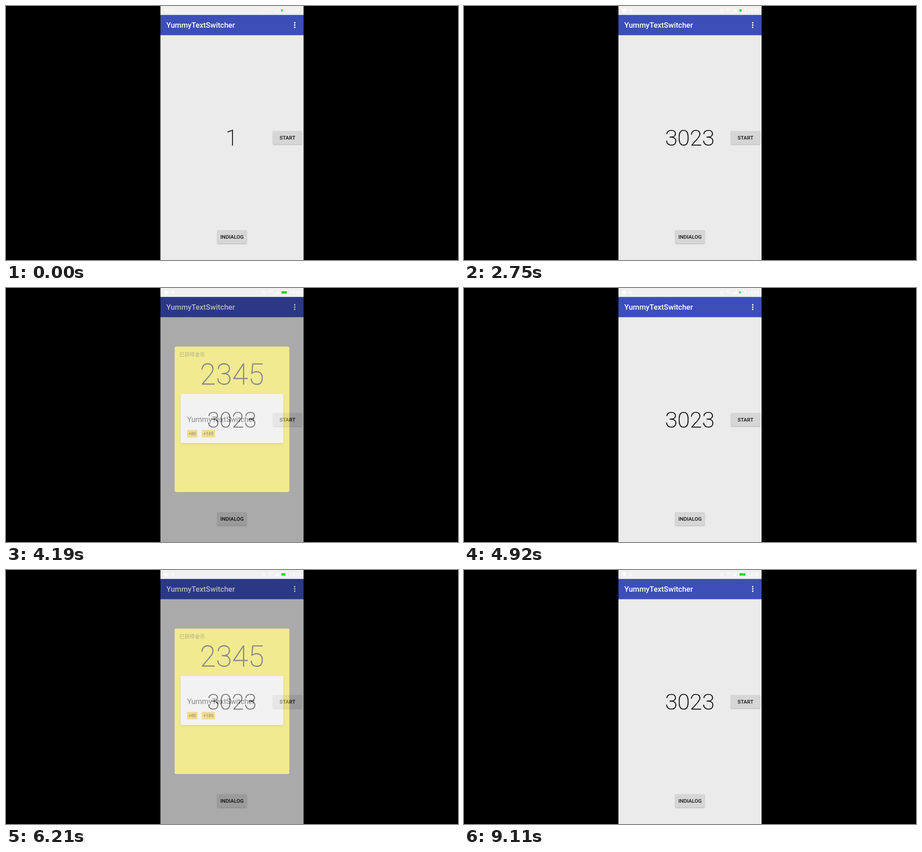
Write an HTML page with a canvas that moves like this. It is 998 by 561 pixels and loops after 9.52 s.

```html
<!DOCTYPE html>
<html lang="en">
<head>
<meta charset="utf-8">
<title>YummyTextSwitcher</title>
<style>
html, body { margin: 0; width: 100%; height: 100%; overflow: hidden; background: #000; }
canvas { display: block; width: 998px; height: 561px; }
</style>
</head>
<body>
<canvas id="stage" width="998" height="561"></canvas>
<script>
const W = 998, H = 561, LOOP = 9520;
const stage = document.getElementById('stage').getContext('2d');
const layer = Object.assign(document.createElement('canvas'), { width: W, height: H });
const dialogCtx = layer.getContext('2d');

const clamp = (v, lo = 0, hi = 1) => Math.min(hi, Math.max(lo, v));
const easeOut = u => 1 - (1 - u) ** 2;

// Main counter: press time and the text shown before it
const SPINS = [{ at: 670, from: '1' }, { at: 6970, from: '3023' }];
const SPIN_DELAY = 253, SPIN_END = 1320;
// Dialog: press time and the moment it starts to close
const DIALOGS = [{ at: 2490, close: 4070 }, { at: 4600, close: 6090 }];
const BATTERY = [2.5, 5, 7, 9, 12, 13.5];

const BIG = { x: 498.5, y: 291, em: 49, cell: 27.2, row: 62, top: 262, bottom: 319 };
const DIALOG_BIG = { x: 499, y: 191.5, em: 64, cell: 35.5, row: 81, top: 156, bottom: 224 };

function rect(c, x, y, w, h, fill, r = 0) {
  c.fillStyle = fill;
  c.beginPath();
  c.roundRect(x, y, w, h, r);
  c.fill();
}

function dot(c, x, y, r, fill) {
  c.fillStyle = fill;
  c.beginPath();
  c.arc(x, y, r, 0, 7);
  c.fill();
}

function label(c, text, x, y, font, fill = '#000', align = 'left') {
  c.font = font;
  c.fillStyle = fill;
  c.textAlign = align;
  c.fillText(text, x, y);
}

function shadowed(c, blur, dy, alpha, draw) {
  c.save();
  c.shadowColor = `rgba(0,0,0,${alpha})`;
  c.shadowBlur = blur;
  c.shadowOffsetY = dy;
  draw();
  c.restore();
}

function digits(c, box, text, cy, blur) {
  const { x, em, cell } = box;
  c.font = `100 ${em}px Roboto, sans-serif`;
  c.textAlign = 'center';
  c.lineJoin = 'round';
  c.lineWidth = em * (0.013 + 0.1 * blur);
  c.fillStyle = c.strokeStyle = '#000';
  c.globalAlpha = 1 - 0.64 * blur;
  c.filter = blur > 0 ? `blur(${em * 0.035 * blur}px)` : 'none';
  [...text].forEach((ch, i) => {
    const dx = x + (i - (text.length - 1) / 2) * cell;
    const dy = cy + em * 0.3555;
    if (blur < 0.5) c.fillText(ch, dx, dy);
    c.strokeText(ch, dx, dy);
  });
}

// A ribbon of rows scrolling upwards through the clipped window
function ribbon(c, box, from, to, rows, pos, blur) {
  c.save();
  c.beginPath();
  c.rect(box.x - box.cell * 2 - 1.5, box.top, box.cell * 4 + 3, box.bottom - box.top);
  c.clip();
  const first = Math.floor(pos);
  for (let k = first; k <= Math.min(first + 1, rows); k++) {
    const text = k === 0 ? from : k === rows ? to : String((k + 8) % 10).repeat(4);
    digits(c, box, text, box.y + (k - pos) * box.row, blur);
  }
  c.restore();
}

const spinBlur = u => clamp((1 - u) * 2.5 - 0.3);

function button(text, x, y) {
  shadowed(stage, 2, 1, 0.25, () => rect(stage, x, y, 65, 29.5, '#d6d6d6', 2));
  label(stage, text, x + 32.5, y + 19, '500 11.5px Roboto, sans-serif', '#111', 'center');
}

function statusBar(t) {
  const c = stage;
  rect(c, 341, 0, 316, 19.5, '#f0f0f0');
  c.save();
  c.globalAlpha = t < 290 ? 0.4 : 1;
  dot(c, 354, 9.5, 4.5, '#fff');
  c.strokeStyle = '#fff';
  c.lineWidth = 1;
  c.beginPath();
  c.moveTo(368, 5); c.lineTo(368, 14);
  c.moveTo(365, 8); c.lineTo(365, 10); c.lineTo(368, 12); c.lineTo(371, 10); c.lineTo(371, 8);
  c.moveTo(572.5, 10); c.arc(568.5, 10, 4, 0, 7);
  c.moveTo(568.5, 7.5); c.lineTo(568.5, 10.5); c.lineTo(570.5, 10.5);
  for (const r of [3, 6, 9]) {
    c.moveTo(583 - r * 0.7, 14 - r * 0.7);
    c.arc(583, 14, r, -Math.PI * 0.75, -Math.PI * 0.25);
  }
  c.rect(607.5, 6.5, 14, 6.5);
  c.stroke();
  for (let i = 0; i < 4; i++) rect(c, 592 + i * 3, 12 - i * 2, 2, 2 + i * 2, '#fff');
  label(c, '14:06', 626, 13.5, '10.5px Roboto, sans-serif', '#fff');
  c.restore();
  const step = Math.floor((Math.min(t, 9500) - 2290) / 401);
  rect(c, 608, 7, BATTERY[(step + 12) % 6], 5.5, '#14dc28');
}

function counter(t) {
  const run = t < 6000 ? SPINS[0] : SPINS[1];
  const u = clamp((t - run.at - SPIN_DELAY) / (SPIN_END - SPIN_DELAY));
  ribbon(stage, BIG, run.from, '3023', 16, 16 * easeOut(u), u > 0 ? spinBlur(u) : 0);
}

function screen(t) {
  rect(stage, 0, 0, W, H, '#000');
  rect(stage, 341, 0, 316, H, '#ebebeb');
  rect(stage, 341, 19.5, 316, 45, '#3c4eb8');
  label(stage, 'YummyTextSwitcher', 354, 48.3, '500 16.46px Roboto, sans-serif', '#fff');
  for (const y of [37, 42, 47]) dot(stage, 637.5, y, 1.75, '#fff');
  counter(t);
  button('START', 589, 276);
  button('INDIALOG', 466.5, 495);
}

function chip(c, text, x, w) {
  rect(c, x, 315, w, 16.3, '#fcc40c');
  label(c, text, x + w / 2, 326.8, '9.9px Roboto, sans-serif', '#000', 'center');
}

function drawDialog(t, run, scale, dy) {
  const c = dialogCtx;
  c.setTransform(1, 0, 0, 1, 0, 0);
  c.clearRect(0, 0, W, H);
  c.translate(499, 291.5 + dy);
  c.scale(scale, scale);
  c.translate(-499, -291.5);
  rect(c, 372.5, 131, 253, 321, '#fcea16', 3);
  label(c, '已获得金币', 382.5, 152.8, '11.4px "Noto Sans CJK SC", "Noto Sans CJK", sans-serif', 'rgba(0,0,0,.58)');
  const u = clamp((t - run.at - 820) / 590);
  ribbon(c, DIALOG_BIG, '8888', '2345', 12, 0.45 + 11.55 * easeOut(u), spinBlur(u));
  shadowed(c, 4, 1.5, 0.3, () => rect(c, 385.5, 235.5, 227, 108.5, '#fdfdfd', 1));
  label(c, 'YummyTextSwitcher', 399.7, 297.3, '16.46px Roboto, sans-serif');
  chip(c, '+80', 399.8, 23);
  chip(c, '+189', 432.4, 29);
}

function dialog(t) {
  const run = DIALOGS.find(d => t >= d.at + 560 && t < d.close + 210);
  if (!run) return;
  const opened = t - run.at - 560;
  const closing = clamp((t - run.close) / 210);
  const rest = (1 - clamp(opened / 260)) ** 2;
  const alpha = Math.min(clamp(opened / 150), 1 - closing);
  const scale = 1 - 0.1 * rest;
  const dy = -25 * rest - 2.6 * closing;

  // The scrim surrounds the card and leaves the area beneath it bright
  stage.fillStyle = `rgba(0,0,0,${0.81 * alpha ** 1.25})`;
  stage.beginPath();
  stage.rect(341, 19.5, 316, H - 19.5);
  stage.roundRect(499 - 126.5 * scale, 291.5 + dy - 160.5 * scale, 253 * scale, 321 * scale, 3);
  stage.fill('evenodd');

  drawDialog(t, run, scale, dy);
  stage.globalAlpha = alpha;
  stage.drawImage(layer, 0, 0);
  stage.globalAlpha = 1;
}

const start = performance.now();
function frame() {
  const t = (performance.now() - start) % LOOP;
  screen(t);
  dialog(t);
  statusBar(t);
  requestAnimationFrame(frame);
}
frame();
</script>
</body>
</html>
```
